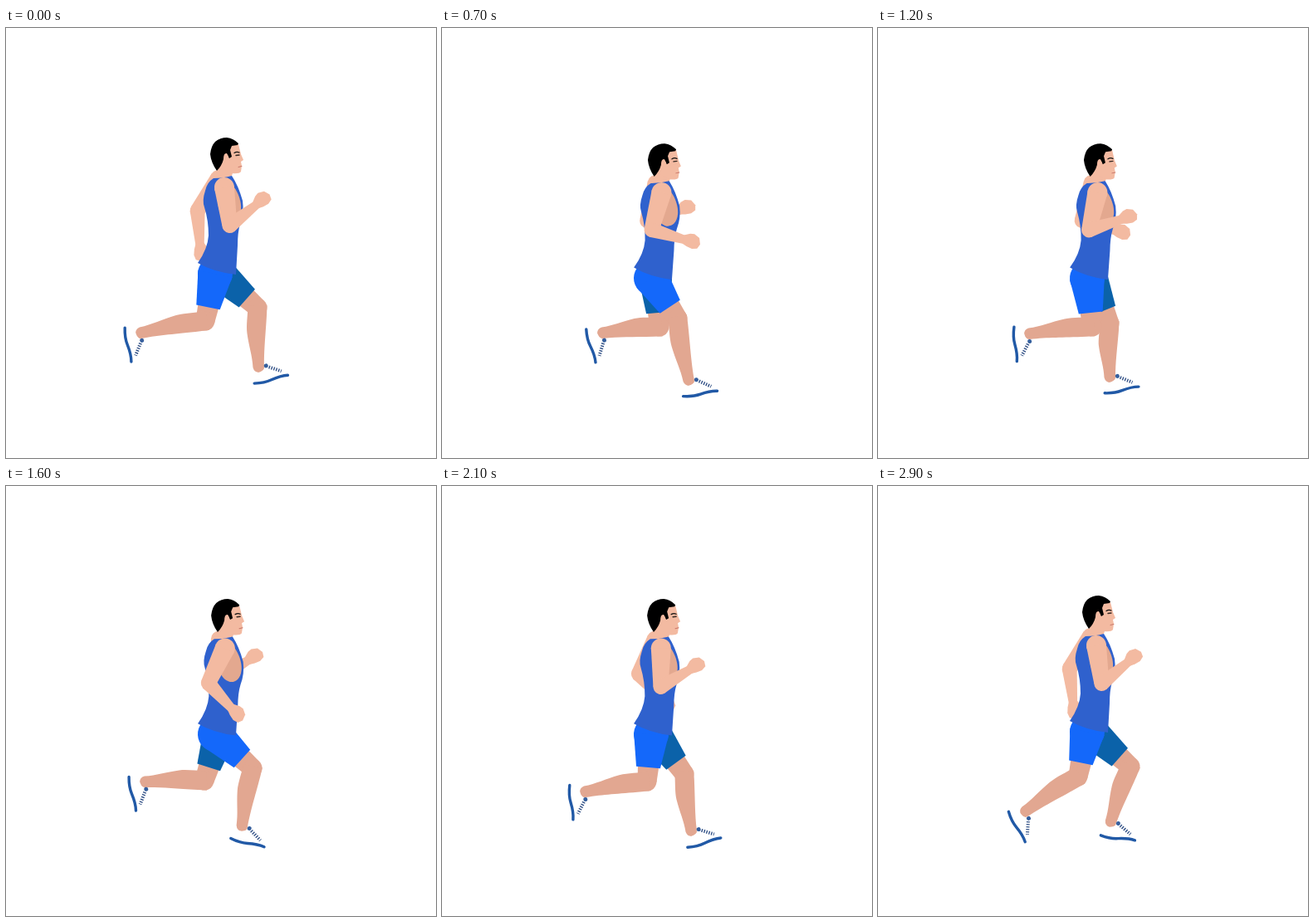
An HTML page with a canvas that plays this animation: 518x518 px, repeating every 3 s.

```html
<!DOCTYPE html>
<html lang="en">
<head>
<meta charset="utf-8">
<title>Runner</title>
<style>
  html, body { margin: 0; width: 100%; height: 100%; overflow: hidden; background: #fff; }
  canvas { display: block; width: 518px; height: 518px; }
</style>
</head>
<body>
<canvas id="stage" width="518" height="518"></canvas>
<script>
const ctx = document.getElementById('stage').getContext('2d');
const STEP = 100, STEPS = 10;

const SKIN = '#f3ba a1'.replace(' ', ''), LEG = '#e2a791', SHADE = '#e3a88f';
const SHIRT = '#2f61cd', SHORTS = '#1468fa', SHORTS_FAR = '#0b62a9', SHOE = '#2159a6';

// Each pose: knee x, knee y, ankle x, ankle y, foot angle
const nearLeg = [
  [240, 353, 162, 367, 80], [247, 356, 172, 368, 85], [258, 360, 182, 368, 86],
  [274, 358, 203, 378, 76], [290, 345, 226, 380, 60], [300, 333, 255, 386, 42],
  [297, 340, 284, 410, 15], [284, 350, 297, 425, -8], [266, 358, 238, 425, 25],
  [241, 350, 177, 392, 62]
];
const farLeg = [
  [303, 337, 304, 409, -13], [292, 347, 300, 416, -15], [279, 356, 279, 421, -10],
  [262, 358, 228, 413, 25], [238, 352, 176, 392, 58], [235, 351, 161, 364, 68],
  [239, 355, 167, 356, 79], [262, 360, 193, 367, 75], [288, 348, 236, 388, 45],
  [304, 338, 280, 405, 9]
];
const upperArm = [82, 90, 102, 114, 123, 123, 115, 104, 91, 82];
const foreArm = [-38, -31, -19, 45, 84, 86, 47, 16, -18, -39];
const dip = [0, 4, 7, 6, 0];

const path = d => new Path2D(d);
const shapes = {
  torso: path('M250 181Q242 186 240 196Q236 208 239 216Q244 232 244 250Q243 266 231 283Q250 294 277 297L279 262Q279 246 282 236Q287 222 285 208Q280 190 272 178Q262 181 250 181Z'),
  armhole: path('M262 183C276 186 284 206 283 218C282 230 274 234 268 232C260 229 256 222 255 208Z'),
  neck: path('M257 166L251 180Q262 184 272 178L274 172L270 158Z'),
  face: path('M268 142L280 140L283 152L286 159L283 161L284 166L283 173Q281 176 272 175L258 168L262 150Z'),
  hair: path('M254 172Q247 162 246 152Q247 142 252 137Q258 132 266 132Q274 133 280 139L279 141L272 142L270 147L272 155L269 157L266 151Q262 150 262 158Q260 166 254 172Z'),
  ear: path('M263 153Q267 150 268 156Q268 160 264 160Z'),
  brow: path('M275 150.5Q278 148.5 281 150'),
  eye: path('M277 153.5L281 153'),
  mouth: path('M280 167.5L284 166.5'),
  fist: path('M39 -5L46 -9L51 -10L58 -7L61 0L59 6L53 8L46 7L40 5Z'),
  shoe: path('M-11 4Q0 9 8 2L26 11Q34 13 33 18L-10 18Z'),
  sole: path('M-9 17.5Q3 20 12 18Q24 15.5 32.5 17'),
  lacing: path('M12.5 2.2L26 10.5')
};

const rad = deg => deg * Math.PI / 180;

function fill(shape, color) {
  ctx.fillStyle = color;
  ctx.fill(shape);
}

function stroke(shape, color, width, cap = 'round', dash = []) {
  ctx.strokeStyle = color;
  ctx.lineWidth = width;
  ctx.lineCap = cap;
  ctx.setLineDash(dash);
  ctx.stroke(shape);
}

function at(x, y, angle, draw) {
  ctx.save();
  ctx.translate(x, y);
  ctx.rotate(angle);
  draw();
  ctx.restore();
}

function dot(x, y, r, color) {
  ctx.fillStyle = color;
  ctx.beginPath();
  ctx.arc(x, y, r, 0, 7);
  ctx.fill();
}

// Tapered bar along +x with a round start
function taper(length, r1, r2, color) {
  dot(0, 0, r1, color);
  fill(path(`M0 ${-r1}L${length} ${-r2}L${length} ${r2}L0 ${r1}Z`), color);
}

function foot() {
  fill(shapes.shoe, '#fff');
  stroke(shapes.sole, SHOE, 3.4);
  dot(9.5, 0, 2.5, '#355f9d');
  stroke(shapes.lacing, '#304f85', 4, 'butt', [1.4, 1.6]);
}

function leg([kx, ky, ax, ay, tilt], hx, hy, hipR, cloth) {
  const thigh = Math.hypot(kx - hx, ky - hy);
  const shin = Math.hypot(ax - kx, ay - ky);
  const calf = path(`M-11.5 -3C-12 10 -14 20 -13 ${shin * .42}C-11 ${shin * .65} -7 ${shin * .8} -6.5 ${shin}` +
    `Q-5 ${shin + 6} 1 ${shin + 6}Q7 ${shin + 5} 7 ${shin}C7 ${shin * .7} 9 ${shin * .5} 11 8L11.5 -3Z`);
  at(hx, hy, Math.atan2(ky - hy, kx - hx), () => {
    fill(path(`M${thigh - 24} -13L${thigh} -11.5V11.5L${thigh - 24} 13Z`), LEG);
  });
  dot(kx, ky, 11.5, LEG);
  at(kx, ky, Math.atan2(ay - ky, ax - kx) - Math.PI / 2, () => fill(calf, LEG));
  at(ax, ay, rad(tilt), foot);
  at(hx, hy, Math.atan2(ky - hy, kx - hx), () => taper(thigh - 17, hipR, 14.5, cloth));
}

function arm(p, x, y, shoulderR) {
  at(x, y, rad(upperArm[p]), () => {
    taper(46.5, shoulderR, 9, SKIN);
    at(46.5, 0, rad(foreArm[p] - upperArm[p]), () => {
      taper(43, 9, 5, SKIN);
      fill(shapes.fist, SKIN);
    });
  });
}

function head() {
  fill(shapes.neck, SKIN);
  fill(shapes.face, SKIN);
  fill(shapes.hair, '#000');
  fill(shapes.ear, SKIN);
  stroke(shapes.brow, '#111', 1.3);
  stroke(shapes.eye, '#332722', 1.4);
  stroke(shapes.mouth, '#c9776a', 1);
}

function withBody(low, draw) {
  at(255, 293 + low * .85, rad(low * .115), () => {
    ctx.translate(-255, -293);
    draw();
  });
}

function drawRunner(p) {
  const low = dip[p % 5], hipY = 296 + low * .75;
  ctx.clearRect(0, 0, 518, 518);
  withBody(low, () => arm((p + 5) % STEPS, 256, 181, 10));
  leg(farLeg[p], 257, hipY, 20, SHORTS_FAR);
  leg(nearLeg[p], 252, hipY, 21, SHORTS);
  withBody(low, () => {
    at(0, low * .15, 0, head);
    fill(shapes.torso, SHIRT);
    fill(shapes.armhole, SHADE);
    arm(p, 263, 192, 12);
  });
}

function tick(now) {
  drawRunner(Math.floor(now / STEP) % STEPS);
  requestAnimationFrame(tick);
}
tick(performance.now());
</script>
</body>
</html>
```
